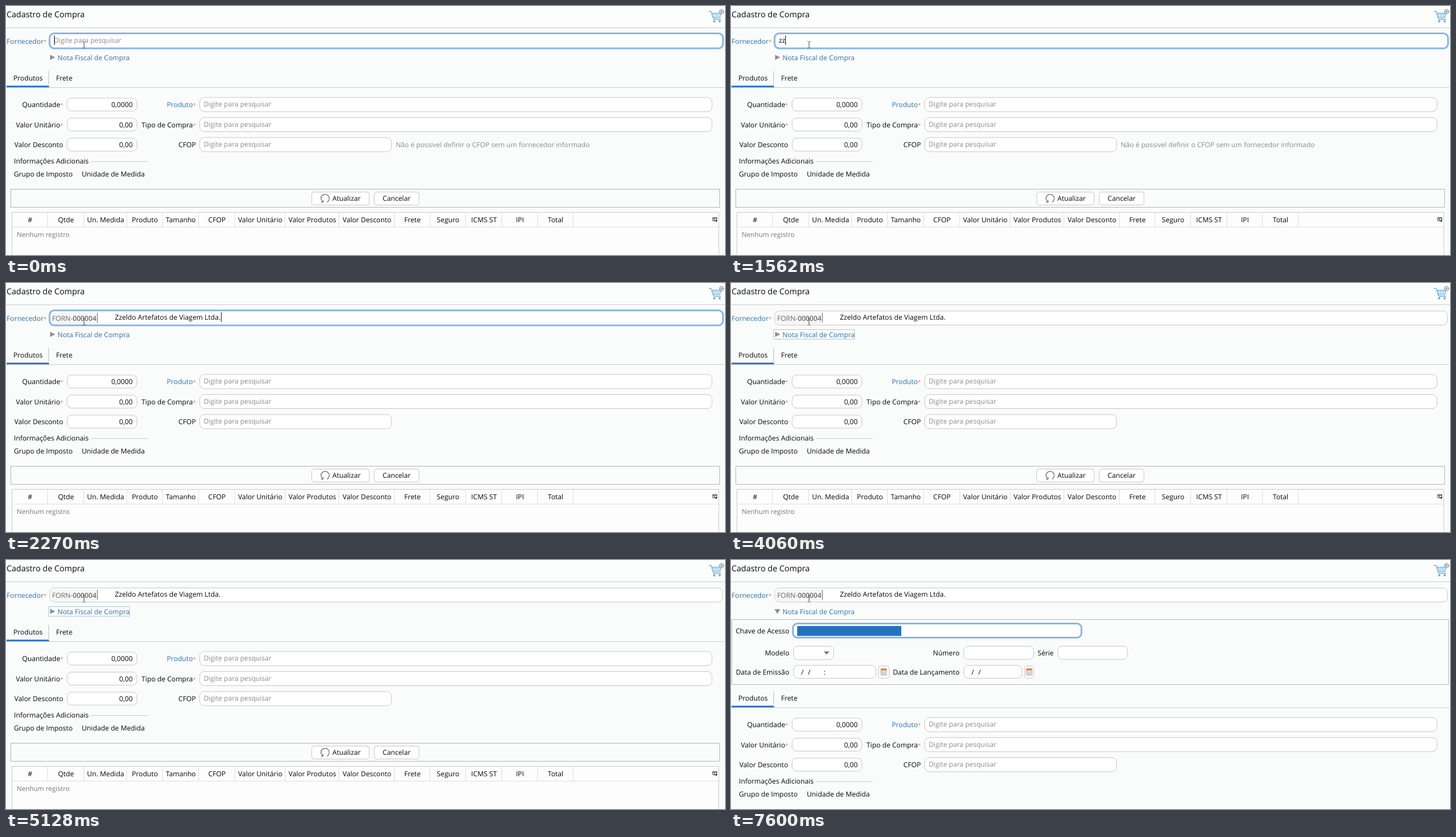
An HTML page for the animation above (8000 ms loop, 1271 by 441 pixels).

```html
<!DOCTYPE html>
<html lang="pt-BR">
<head>
<meta charset="utf-8">
<title>Cadastro de Compra</title>
<style>
html, body { margin: 0; width: 100%; height: 100%; overflow: hidden; background: #fafbfb; }
svg { display: block; width: 100%; height: 100%; }
text { font: 12.2px "Open Sans", "Noto Sans", sans-serif; fill: #080808; white-space: pre; text-rendering: geometricPrecision; }
.title { font-size: 14.4px; }
.ph { fill: #8b8b8b; font-size: 12.1px; }
.link { fill: #2c72b2; }
.star { fill: #e08a3a; font-size: 9.5px; }
.code { fill: #686868; }
.code tspan { font-weight: 600; }
.empty { fill: #777; font-size: 11.8px; }
.field { fill: #fff; stroke: #c6c6c6; }
.focus { fill: #fff; stroke: #86b6ea; stroke-width: 3; }
.box { fill: none; stroke: #b4b4b4; }
.line { fill: none; stroke: #cbcbcb; }
.col { fill: none; stroke: #dedede; }
.caret { fill: none; stroke: #111; }
.grey { fill: #8f8f8f; }
.head { fill: #fcfdfd; }
.tag { fill: #f6f6f6; }
.bar { fill: #3579c6; }
.selection { fill: #2472be; }
.grid { fill: #fdfdfd; stroke: #cbcbcb; }
</style>
</head>
<body>
<svg id="stage" viewBox="0 0 1271 441"></svg>
<script>
const LOOP = 8000;
const HINT = 'Digite para pesquisar';
const NAME = 'Zzeldo Artefatos de Viagem Ltda.';

const text = (x, y, s, cls = '', anchor = 'start') =>
  `<text x="${x}" y="${y}" class="${cls}" text-anchor="${anchor}">${s}</text>`;
const right = (x, y, s, cls) => text(x, y, s, cls, 'end');
const mid = (x, y, s, cls) => text(x, y, s, cls, 'middle');
const rect = (x1, y1, x2, y2, r, cls) =>
  `<rect x="${x1}" y="${y1}" width="${x2 - x1}" height="${y2 - y1}" rx="${r}" class="${cls}"/>`;
const field = (x1, y1, x2, y2) => rect(x1, y1, x2, y2, 8, 'field');
const path = (d, cls, extra = '') => `<path d="${d}" class="${cls}" ${extra}/>`;
const group = (id, ...parts) => `<g id="${id}">${parts.join('')}</g>`;
const req = s => s + '<tspan class="star">*</tspan>';

function cart() {
  return `<g fill="none" stroke="#757c8a" stroke-linecap="round">
    <path d="M1243 9.5h3.5l4.5 14h12.5"/>
    <path d="M1247.5 12.5h17l-2.5 8.5h-12z" fill="#a5d6f1" stroke="#6fb5de"/>
    <path d="M1252 13l1.5 8M1256.5 13v8M1261 13l-1.5 8M1249 16.8h14" stroke="#e6f5fc" stroke-width=".8"/>
    <g fill="#5fb0e0" stroke="none"><circle cx="1252" cy="27" r="2"/><circle cx="1261.5" cy="27" r="2"/></g>
    <circle cx="1265" cy="10" r="3.8" fill="#f4f4f8"/>
    <path d="M1263 10h4M1265 8v4"/>
  </g>`;
}

function header() {
  return rect(0, 0, 1271, 38, 0, 'head') +
    text(1, 20, 'Cadastro de Compra', 'title') + cart() +
    path('M0 38.5H1271', 'line') +
    text(1, 67, req('Fornecedor'), 'link') +
    text(91, 95.5, 'Nota Fiscal de Compra', 'link');
}

function supplier() {
  return group('idle', field(77.5, 49.5, 1266.5, 74.5)) +
    group('focused', rect(77, 48.5, 1267.5, 75, 8, 'focus')) +
    group('blank', text(84.5, 65, HINT, 'ph'), path('M85.5 52V69', 'caret')) +
    group('typed', text(84.5, 65, 'zz'), path('M96.5 52V69', 'caret')) +
    group('picked',
      rect(80, 52, 162, 73, 4, 'tag'),
      text(81.5, 67, 'FORN-<tspan>000004</tspan>', 'code'),
      path('M161.5 53V70', 'caret', 'style="stroke:#666"'),
      text(192.5, 65, NAME)) +
    group('endCaret', path('M380.5 52V69', 'caret'));
}

function toggle() {
  return group('closed', path('M78 86.5L87 91L78 95.5z', 'grey')) +
    group('open', path('M77 87H87L82 95.5z', 'grey')) +
    group('linkFocus', path('M76 82.5H218.5V99.5H75.5V82.5', '',
      'fill="none" stroke="#5b8fc4" stroke-dasharray="1 1"'));
}

function calendar(x, w) {
  const c = x + w / 2;
  return rect(x, 187.5, x + w, 209.5, 4, 'field') +
    `<rect x="${c - 5}" y="192.5" width="10" height="11.5" rx="1" fill="#eee7df" stroke="#a99f96" stroke-width=".8"/>
     <rect x="${c - 5}" y="192" width="10" height="3.6" fill="#d9864b"/>
     <path d="M${c - 3.5} 198h7M${c - 3.5} 200.2h7M${c - 3.5} 202.3h7" stroke="#a8a29c" stroke-dasharray="1.4 .8"/>`;
}

function invoice() {
  return group('invoice',
    rect(1.5, 105.5, 1268.5, 220.5, 0, 'box'),
    right(103, 130, 'Chave de Acesso'),
    group('keyIdle', field(110.5, 113.5, 618.5, 137)),
    group('keyFocus', rect(109.5, 112.5, 619.5, 137.5, 8, 'focus'),
      rect(117, 117, 301, 134.5, 0, 'selection')),
    right(103, 169, 'Modelo'),
    field(110.5, 152.5, 181.5, 176.5),
    path('M164 162H174L169 167.5z', 'grey', 'style="fill:#777"'),
    right(404, 169, 'Número'),
    field(411.5, 152.5, 535, 176),
    text(542, 169, 'Série'),
    field(577.5, 152.5, 701, 176),
    right(103, 203, 'Data de Emissão'),
    field(110.5, 186.5, 256, 209.5),
    text(124, 203, '/'), text(136, 203, '/'), text(164, 203, ':'),
    calendar(260.5, 19),
    right(404, 203, 'Data de Lançamento'),
    field(411.5, 186.5, 514.5, 209.5),
    text(425, 203, '/'), text(437, 203, '/'),
    calendar(519, 16));
}

function form() {
  const rows = [
    [174.5, req('Quantidade'), '0,0000', req('Produto'), 1248, 'link'],
    [210, req('Valor Unitário'), '0,00', req('Tipo de Compra'), 1248, ''],
    [245.5, 'Valor Desconto', '0,00', 'CFOP', 681.5, ''],
  ];
  return text(13, 132, 'Produtos') + text(88.5, 132, 'Frete') +
    path('M75.5 115V139', 'line', 'style="stroke:#bbb"') +
    path('M0 144.5H1270', 'line') +
    rect(1, 141, 76, 144, 0, 'bar') +
    rows.map(([y, a, val, b, x2, cls]) =>
      right(101, y + 4.5, a) + field(108, y - 11.5, 231.5, y + 11.5) +
      right(224, y + 4.5, val) + right(335.5, y + 4.5, b, cls) +
      field(342.5, y - 12.5, x2, y + 12.5) + text(349.5, y + 3.5, HINT, 'ph')).join('') +
    group('warning', text(689, 250, 'Não é possivel definir o CFOP sem um fornecedor informado', 'ph')) +
    text(14, 279, 'Informações Adicionais') + path('M150 275.5H251', 'line') +
    text(14, 302, 'Grupo de Imposto') + text(134, 302, 'Unidade de Medida');
}

function table() {
  const names = ['#', 'Qtde', 'Un. Medida', 'Produto', 'Tamanho', 'CFOP', 'Valor Unitário',
    'Valor Produtos', 'Valor Desconto', 'Frete', 'Seguro', 'ICMS ST', 'IPI', 'Total'];
  const edges = [10.5, 73.5, 137.5, 213.5, 276.5, 340.5, 404.5, 493.5, 588.5, 686.5,
    749.5, 812.5, 876.5, 939.5, 1002.5];
  return rect(8.5, 324.5, 1261.5, 356.5, 0, 'box') +
    rect(540.5, 329.5, 642, 352.5, 4, 'field') +
    path('M559.5 346.5A7.3 7.3 0 1 1 567.5 347.3', '', 'fill="none" stroke="#666" stroke-width="1.3"') +
    path('M556.5 347.5H560.5V343.5', '', 'fill="none" stroke="#666" stroke-width="1.2"') +
    text(577, 345, 'Atualizar') +
    rect(651, 329.5, 730, 352.5, 4, 'field') + mid(690.5, 345, 'Cancelar') +
    rect(10.5, 365.5, 1260, 460, 0, 'grid') +
    path('M10 391.5H1260', 'col') +
    names.map((s, i) => mid((edges[i] + edges[i + 1]) / 2 + .5, 383, s) +
      path(`M${edges[i + 1]} 366V391`, 'col')).join('') +
    path('M1249.5 374.5H1256.5V380.5H1249.5zM1249 376.5H1257M1252.5 376V380', 'caret',
      'stroke-width=".8"') +
    path('M1253.5 379.5H1257.5L1255.5 382.5z', '') +
    text(19, 408.5, 'Nenhum registro', 'empty');
}

const ibeam = path('M135.5 62.5H137M139 62.5H140.5M138 63V74M135.5 74.5H137M139 74.5H140.5',
  'caret', 'style="stroke:#3a3a3a"');

document.getElementById('stage').innerHTML =
  header() + supplier() + toggle() + invoice() +
  group('body', form(), group('list', table())) + ibeam;

// Visible interval of each part, in ms
const shown = {
  blank: [0, 500],
  typed: [500, 2270],
  warning: [0, 2270],
  focused: [0, 4060],
  endCaret: [2270, 4060],
  picked: [2270, LOOP],
  idle: [4060, LOOP],
  linkFocus: [4060, 7600],
  closed: [0, 5840],
  list: [0, 5840],
  open: [5840, LOOP],
  invoice: [5840, LOOP],
  keyIdle: [5840, 7600],
  keyFocus: [7600, LOOP],
};

function play(id, prop, steps) {
  const frames = steps.map(([t, v]) => ({ offset: t / LOOP, [prop]: v, easing: 'step-end' }));
  frames.push({ offset: 1, [prop]: steps[steps.length - 1][1] });
  document.getElementById(id).animate(frames, { duration: LOOP, iterations: Infinity });
}

for (const [id, [from, to]] of Object.entries(shown)) {
  const steps = [[0, from ? 0 : 1]];
  if (from) steps.push([from, 1]);
  if (to < LOOP) steps.push([to, 0]);
  play(id, 'opacity', steps);
}
play('body', 'transform', [[0, 'translateY(0px)'], [5840, 'translateY(117px)']]);
</script>
</body>
</html>
```
